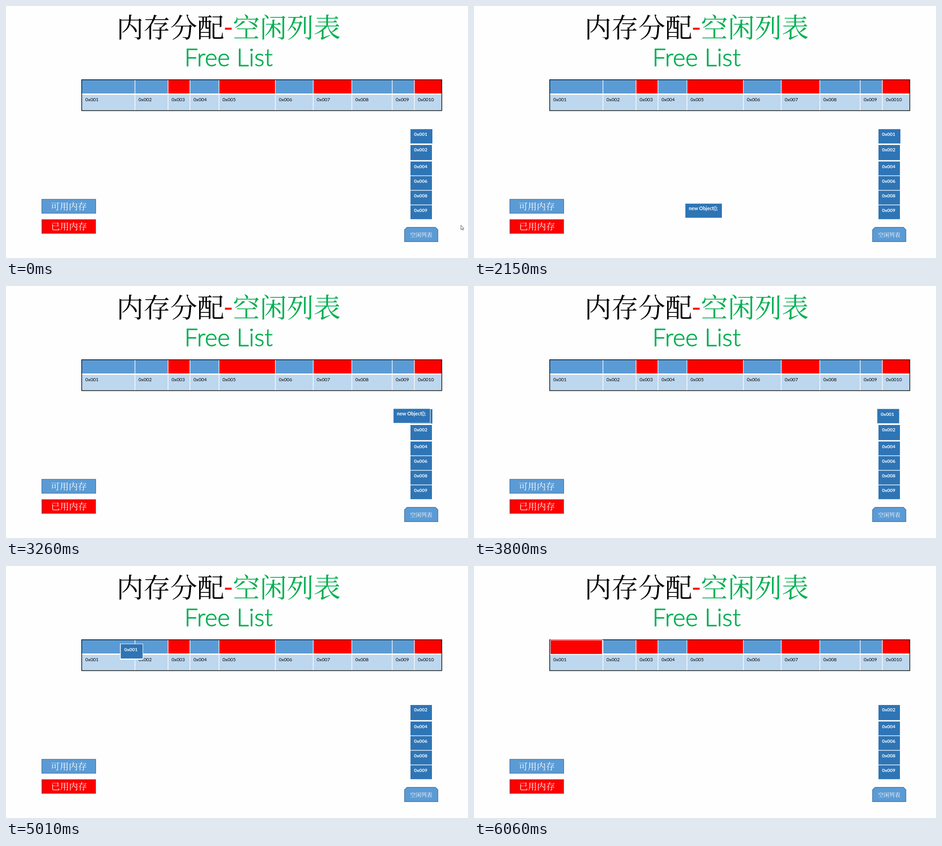
These frames come from a looping animation (1012 by 553 pixels, 9.21 s). An HTML page:

```html
<!DOCTYPE html>
<html lang="zh-CN">
<head>
<meta charset="utf-8">
<title>内存分配 - 空闲列表</title>
<style>
  html, body { margin: 0; width: 100%; height: 100%; overflow: hidden; background: #fefefe; }
  svg { display: block; width: 100%; height: 100%; }
  text { font-family: Lato, "Open Sans", sans-serif; font-size: 10.3px; }
  .han { font-family: "Noto Serif CJK SC", "Noto Sans CJK SC", "Noto Sans CJK", sans-serif; font-weight: 300; }
  .title { font-size: 59px; }
  .sub { font-size: 53px; font-weight: 300; text-anchor: middle; stroke: #00b050; stroke-width: 1; }
  .key { font-size: 19.8px; fill: #fff; }
  .bold { font-weight: 700; fill: #fff; }
  .free { fill: #5b9bd5; }
  .used { fill: #f00; }
  .dark { fill: #2e75b6; }
  .green { fill: #00b050; }
  .edge { stroke: #41719c; stroke-width: 1.3; }
</style>
</head>
<body>
<svg viewBox="0 0 1012 553" xmlns="http://www.w3.org/2000/svg">
  <defs><clipPath id="bars"></clipPath></defs>

  <text class="han title" x="242" y="69">内存分配</text>
  <text class="title used" x="487" y="67" text-anchor="middle">-</text>
  <text class="han title green" x="497" y="69">空闲列表</text>
  <text class="sub green" x="487.5" y="132">Free List</text>

  <g id="table"></g>

  <rect class="free edge" x="78.5" y="424.2" width="118" height="30.6"/>
  <text class="han key" x="98" y="446.5">可用内存</text>
  <rect class="used edge" x="78.5" y="468.7" width="118" height="30.4"/>
  <text class="han key" x="98.5" y="491">已用内存</text>

  <g id="list"></g>
  <path class="free edge" d="M873 491 L878.5 485.6 H940.5 L946 491 V517 H873 Z"/>
  <text class="han key" x="885" y="507" style="font-size:12.2px">空闲列表</text>

  <g id="block">
    <rect x="-1.5" y="-1" width="50.5" height="35.3" fill="#fff"/>
    <rect class="dark" width="48" height="31.5"/>
    <text class="bold" x="7.7" y="15.2">0x001</text>
  </g>

  <g id="request">
    <rect x="-41" y="-16.3" width="82" height="32.6" fill="#fff"/>
    <rect class="dark" x="-40" y="-15.5" width="80" height="31"/>
    <text class="bold" x="-32.5" y="-1" style="font-size:10.7px">new Object();</text>
  </g>
  <path id="route" d="M503 489 V416 C503 340 580 285 760 285 H908" fill="none"/>

  <g clip-path="url(#bars)">
    <rect x="167" y="161.7" width="115" height="33.5" fill="#fff"/>
    <rect class="used" x="168" y="163" width="112.5" height="30"/>
  </g>

  <path id="cursor" d="M0 0 V9.6 L2.2 7.6 L3.8 11 L5.3 10.3 L3.8 7.1 H6.7 Z"
        fill="#fff" stroke="#333" stroke-width=".8"/>
</svg>
<script>
const LOOP = 9210;
const APPEAR = 1280;            // the request pops up
const START = 1470, STEP = 135; // poses then advance in even steps
const GLIDE = 1600;             // duration of each path
const $ = id => document.getElementById(id);

function add(parent, tag, attrs, text = '') {
  const el = document.createElementNS('http://www.w3.org/2000/svg', tag);
  for (const name in attrs) el.setAttribute(name, attrs[name]);
  el.textContent = text;
  return parent.appendChild(el);
}

function drawTable() {
  const table = $('table');
  const edges = [166, 282.5, 355, 403, 466.5, 590, 673, 757.5, 846, 894.5, 954.5];
  const inUse = [3, 5, 7, 10];
  for (let n = 1; n <= 10; n++) {
    const x = edges[n - 1], width = edges[n] - x;
    add(table, 'rect', { x, y: 162, width, height: 30.5, class: inUse.includes(n) ? 'used' : 'free' });
    add(table, 'rect', { x, y: 194.5, width, height: 35, fill: '#bdd7ee' });
    add(table, 'text', { x: x + 7.8, y: 209 }, '0x00' + n);
    if (n > 1) add(table, 'path', { d: `M${x} 162 V230`, stroke: '#fff', 'stroke-width': 1.4 });
  }
  add(table, 'path', { d: 'M166 193.5 H955', stroke: '#fff', 'stroke-width': 2.8 });
  add(table, 'rect', { x: 165.8, y: 161.8, width: 788.8, height: 67.8, fill: 'none', stroke: '#111', 'stroke-width': 1.5 });
}

function addEntry(n, y, height) {
  add($('list'), 'rect', { x: 886, y, width: 47, height, class: 'dark' });
  add($('list'), 'text', { x: 893.7, y: y + 14.3, class: 'bold' }, '0x00' + n);
}

function drawList() {
  addEntry(2, 305, 33.2);
  [4, 6, 8, 9].forEach((n, i) => addEntry(n, 341.2 + 32 * i, 30.6));
}

// Vertical strips that uncover the red cell in random order.
const strips = Array.from({ length: 39 }, (_, i) => ({
  rank: Math.abs(Math.sin((i + 1) * 12.9898) * 43758.5453) % 1,
  el: add($('bars'), 'rect', { x: 167 + i * 3, y: 160, width: 3, height: 37 })
}));

const progress = (t, from, duration) => Math.min(1, Math.max(0, (t - from) / duration));
const ease = p => p < .5 ? 2 * p * p : 1 - 2 * (1 - p) ** 2;
const place = (id, x, y, scale = 1) =>
  $(id).setAttribute('transform', `translate(${x} ${y}) scale(${scale})`);
const show = (el, on) => el.setAttribute('display', on ? 'inline' : 'none');

const route = $('route');
const routeLength = route.getTotalLength();

function draw() {
  const t = performance.now() % LOOP;
  const pose = t < START ? APPEAR : START + Math.floor((t - START) / STEP) * STEP;

  const spot = route.getPointAtLength(routeLength * ease(progress(pose, 1838, GLIDE)));
  show($('request'), t >= APPEAR && t < 3680);
  place('request', spot.x, spot.y, progress(pose, 1150, 460));

  const shift = ease(progress(pose, 3695, GLIDE));
  const filled = progress(pose, 5475, 500);
  show($('block'), filled < 1);
  place('block', 886 - 688 * shift, 270.2 - 107 * shift);
  for (const { rank, el } of strips) show(el, rank < filled);

  const gone = pose - APPEAR;
  place('cursor', 996.5 + gone * .045, 481 + gone * .16);
  show($('cursor'), gone < 450);
  requestAnimationFrame(draw);
}

drawTable();
drawList();
draw();
</script>
</body>
</html>
```
